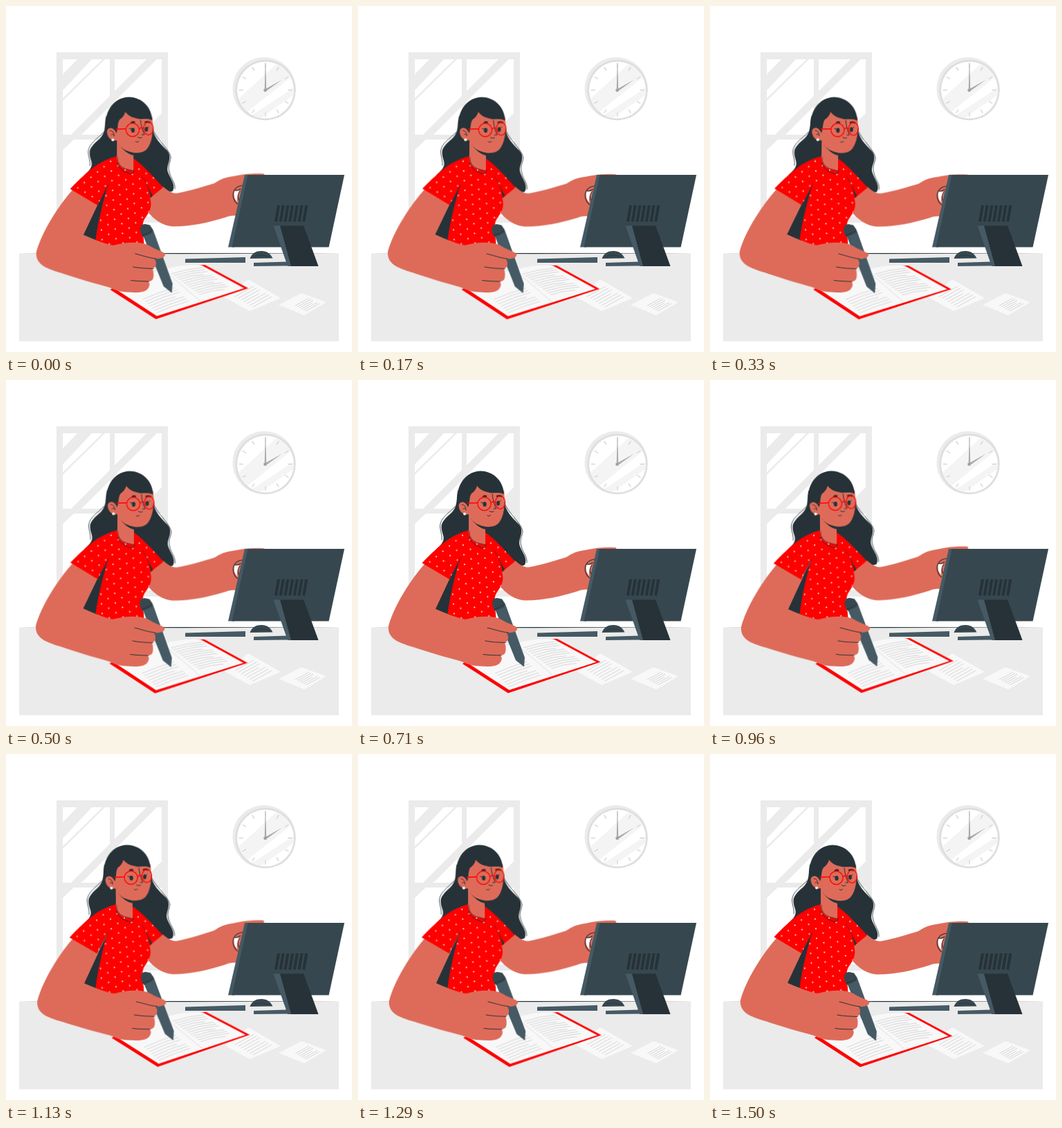
Recreate the animation shown at these times as an HTML page. Size 500x500 px, loop 1.54 s.

```html
<!DOCTYPE html>
<html lang="en">
<head>
<meta charset="utf-8">
<title>Woman writing at a desk</title>
<style>
html, body { margin: 0; width: 100%; height: 100%; overflow: hidden; background: #fff; }
svg { display: block; width: 100%; height: 100%; }
.sway {
  transform-origin: var(--o);
  animation: sway 770ms cubic-bezier(.37, 0, .63, 1) -435ms infinite alternate;
}
@keyframes sway {
  from { transform: rotate(calc(var(--a) * -1)); }
  to { transform: rotate(var(--a)); }
}
.torso { --o: 165px 340px; --a: .55deg; }
.head { --o: 174px 225px; --a: .45deg; }
.reach { --o: 215px 285px; --a: .6deg; }
.write { --o: 180px 240px; --a: .58deg; }
.skin { fill: #de6b59; }
.dark { fill: #263238; }
.slate { fill: #37474f; }
.steel { fill: #455a64; }
.red { fill: #f00; }
.pale { fill: #ebebeb; }
.page { fill: #f8f8f8; }
.ink { fill: none; stroke: #263238; stroke-linecap: round; stroke-linejoin: round; }
.frame { fill: none; stroke: #f00; stroke-width: 1.3; }
.text { fill: none; stroke: #cdcdcd; stroke-width: .8; }
</style>
</head>
<body>
<svg viewBox="0 0 500 500">
  <defs>
    <pattern id="dots" width="20" height="14" patternUnits="userSpaceOnUse" patternTransform="rotate(-4)">
      <rect width="20" height="14" fill="#f00"/>
      <circle cx="5" cy="3.500" r="1" fill="#fff"/>
      <circle cx="15" cy="10.500" r="1" fill="#fff"/>
    </pattern>
    <clipPath id="face"><circle cx="375" cy="121.500" r="41"/></clipPath>
  </defs>

  <!-- window -->
  <path class="pale" fill-rule="evenodd" d="M73 67H234V313H73Z M82 77H150V186H82Z M157 77H225V186H157Z M82 193H150V304H82Z M157 193H225V304H157Z"/>
  <path class="pale" d="M82 99L103 77H124L82 122Z M82 133.500L139.500 77H143L82 137Z M94 186L203 77H218L109 186Z M82 193H98L82 208Z M225 155V186H194Z"/>

  <!-- clock -->
  <circle class="pale" cx="373" cy="119.500" r="45.500"/>
  <circle cx="375" cy="121.500" r="43.700" fill="#dedede"/>
  <circle cx="375" cy="121.500" r="41" fill="#fff"/>
  <path clip-path="url(#face)" fill="#f4f4f4" d="M325 144L395 80L418 98L345 156Z M352 160L425 112V122L362 166Z"/>
  <circle cx="375" cy="121.500" r="35.300" fill="none" stroke="#c7c7c7" stroke-width="6" pathLength="219.600" stroke-dasharray="1 17.300" stroke-dashoffset=".5"/>
  <path fill="#a8a8a8" d="M373.700 122L374.600 82H375.200L376.200 122Z M374 120.500L399 106.500L375.500 123.300Z"/>
  <circle cx="374.500" cy="121.700" r="2.300" fill="#a0a0a0"/>

  <!-- desk -->
  <path class="pale" d="M19 357.500H481V484.500H19Z"/>
  <path class="dark" d="M19 357.600L250 357L481 357.600L250 358.200Z"/>
  <path class="page" d="M350 395L397 422L352 441L316 421Z M427 415L463 428L431 447L394 432Z"/>
  <path class="text" id="sheetA"/>
  <path class="text" id="sheetB"/>

  <!-- hair behind the body -->
  <g class="sway torso"><g class="sway head">
    <path class="dark" d="M144 160C143 176 142 185 135 192C127 199 120 205 120.500 213C121 226 131 229 113 245L150 250L207 266Q236 271 241 267C247 256 232 244 233 234C234 226 240 218 233 209C222 198 213 190 211 174L178 150Z"/>
    <path class="ink" stroke-width=".8" d="M140 183C132 192 119 199 118.500 211C119 220 122 224 121 231 M211 176C216 192 237 207 238 219C237 226 233 231 236 240C238 249 245 255 244 264"/>
  </g></g>

  <!-- reaching arm -->
  <g class="sway reach">
    <path class="skin" d="M200 270L227 261C235 268 241 271 247 270.500C267 267 287 260 301 256C310 250 317 247 330 245.500C347 242 358 241.500 372 242Q375 243 372 248L345 303C330 303 325 302 318 305C293 313 264 319 241 318.500C227 317 215 311 200 292Z"/>
    <path fill="#fff" d="M330 267Q334 268 338 266Q333 274 334 283Q328 276 330 267Z"/>
    <path class="ink" stroke-width="1.100" d="M342 259C331 260 326 269 329 278Q331 284 335 286 M330 266Q336 267 339 264 M338 267Q333 274 337 281"/>
  </g>

  <!-- monitor, keyboard and mouse -->
  <path class="steel" d="M259 365.500L346 363V371H259Z M358 371L407 369.500V375.500L358 376Z M345 244H352L330 348.500H321Z"/>
  <path class="slate" d="M349.500 244H489L466.500 348.500H326.500Z"/>
  <path class="slate" d="M352.500 365C355 357 362 354 369 354C377 354 382 358 385.500 364.500Z"/>
  <path class="ink" stroke-width="1" d="M359 362Q369 357 380 363" opacity=".6"/>
  <path fill="none" stroke="#263238" stroke-width="4" d="M394 288L390 311.500m10.700-23.500l-4 23.500m10.700-23.500l-4 23.500m10.700-23.500l-4 23.500m10.700-23.500l-4 23.500m10.700-23.500l-4 23.500m10.700-23.500l-4 23.500"/>
  <path class="steel" d="M386.500 317.500H398L415 376H407Z"/>
  <path class="dark" d="M396 317.500H430L451.500 376H412Z"/>

  <!-- book and the shadow under the writing arm -->
  <g class="sway write">
    <path class="red" d="M151 410L160 404L283 374H288L350.500 407.500L217 452.500Z"/>
    <path class="page" d="M157 408L165 395L228 381Q256 372 283 374.500L344.500 407.500L218.500 448Z"/>
    <path fill="none" stroke="#dedede" d="M230 383L281 426"/>
    <path class="text" id="left"/>
    <path class="text" id="right"/>
    <path class="dark" d="M148 257L133 285L111 331L133 341L152 290Z"/>
  </g>

  <!-- torso -->
  <g class="sway torso">
    <path fill="url(#dots)" d="M147 258C140 285 133 310 129.500 338Q143 346 155 350H199C201 335 194 318 200 308C207 298 212 290 208 277.500L227 262C212 246 198 230 185 221L161 217Z"/>
    <path class="dark" d="M195 245C202 253 207 265 209 277L212 274C205 263 202 251 195 245Z"/>
  </g>

  <!-- pen and writing arm -->
  <g class="sway write">
    <path class="steel" d="M198 331L213 324L241 401L240 414.500L228 405Z"/>
    <path class="slate" d="M194 321Q195 315 201 315L208 316.500L212.500 323L211.500 328L198 334L194.500 327Z"/>
    <path class="ink" stroke-width="1" d="M197 331Q205 330 212 324"/>
    <path class="skin" d="M98 264C77 287 52 326 44 356C43 373 56 379 80 386C104 394 128 401 149 406.500C160 411 163 413 177 413.500C192 415 202 413 205 409Q210 403 206 398Q213 398 213.500 391Q214 384 212 380Q218 377 217 370L215 365Q229 366 230.500 359C228 354 217 353 207 346C195 340 175 341 155 346C140 343 127 337 112 331L133 286L125 260Z"/>
    <path class="ink" stroke-width="1" d="M187 358C199 361 207 364 217 365 M184 377C194 379 203 379 213 379.500 M181 396.500C191 398 198 397.500 207 398"/>
  </g>

  <!-- near sleeve, neck and head -->
  <g class="sway torso">
    <path fill="url(#dots)" d="M161 217C136 223 120 236 92.500 264.500L132 288L148 258L175 240Z"/>
    <path class="ink" stroke-width=".8" d="M147.500 258.500L136 282"/>
    <path class="skin" d="M160 190V219Q161 231 171 235L184 238V204Z"/>
    <path class="ink" stroke-width=".9" d="M160.500 227C164 237 173 240 180 243Q184 242 185 237"/>
    <path class="ink" stroke-width=".6" d="M161 218Q160 230 172 235L184 238"/>
    <g class="sway head">
      <path class="dark" d="M163 200Q172 213 184 216V208Z"/>
      <path class="skin" d="M160 155L172 149L211 160C213 181 211 198 203 207C196 214 183 213 174 209Q164 205 160 194C152 196 146 190 145.500 182C146 175 155 174 159 180Z"/>
      <path class="dark" d="M143 180C141 151 156 132 177 131.500C197 132 210 147 211 165C202 161 195 165 187 162Q177 160 172 153Q170 160 164 164C160 169 162 178 159 184Q155 174 147 177Z"/>
      <path class="ink" stroke-width=".9" d="M150 180Q155 180 156 187 M152 186Q155 184 156 188"/>
      <circle cx="154" cy="193.500" r="1.900" fill="#fff"/>
      <path class="ink" stroke-width="1" d="M194 165C195 174 197 180 199.500 186H196 M190 189.500Q193 192 196 190 M187 196Q189.500 198 191.500 195.500"/>
      <path class="ink" stroke-width="2.600" d="M181 168.500Q183 167 185 168 M201 168Q204 166.500 207 168"/>
      <ellipse class="dark" cx="183" cy="179.500" rx="2.600" ry="3.400"/>
      <ellipse class="dark" cx="202.500" cy="178" rx="2.400" ry="3.400"/>
      <path class="ink" stroke-width="1" d="M178 177L182 178 M203 177L206 174.500"/>
      <g class="frame">
        <circle cx="182.500" cy="179" r="9.600"/>
        <ellipse cx="205.500" cy="177" rx="7" ry="9.300"/>
        <path d="M158 178L173 177.500 M192 178Q195 174 198.500 177"/>
      </g>
    </g>
  </g>
</svg>
<script>
// Rows of writing: n strokes of run (w, h), each stepped by (dx, dy)
function rows(id, n, x, y, w, h, dx, dy, bend) {
  let d = '';
  for (let i = 0; i < n; i++) {
    const len = i % 4 === 3 ? 0.8 : 1;
    d += `M${x + i * dx} ${y + i * dy}q${w * len / 2} ${h * len / 2 + bend} ${w * len} ${h * len}`;
  }
  document.getElementById(id).setAttribute('d', d);
}
rows('right', 12, 239, 387, 45, -9, 3.7, 2.7, -3);
rows('left', 7, 198, 424, 46, -17, 3.4, 3.2, -2);
rows('sheetA', 7, 331, 420, 27, -15, 4.3, 2.5, 0);
rows('sheetB', 6, 418, 433, 20, -11, 3, 1.6, 0);
</script>
</body>
</html>
```
